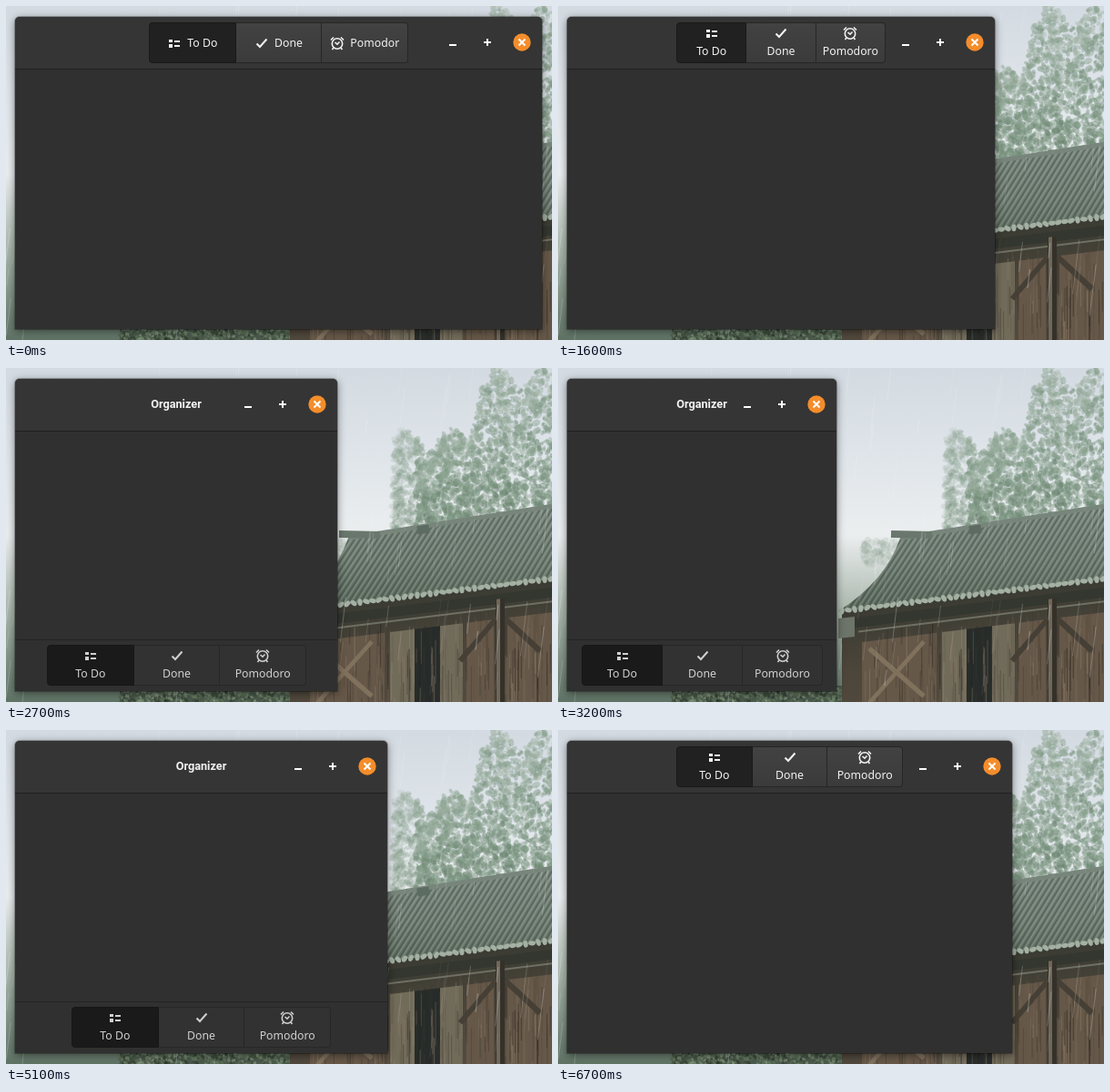
Recreate the animation shown at these times as an HTML page with a canvas. Size 600x368 px, loop 10 s.

```html
<!DOCTYPE html>
<html lang="en">
<head>
<meta charset="utf-8">
<title>Organizer</title>
<style>
html, body { margin: 0; width: 100%; height: 100%; overflow: hidden; background: #dde3e6; }
canvas { position: absolute; left: 0; top: 0; }
#win {
  position: absolute; left: 10px; top: 12px; height: 344px;
  background: #303030; border-radius: 5px 5px 0 0;
  box-shadow: 0 0 0 1px rgba(0,0,0,.25), 0 2px 10px rgba(0,0,0,.5);
  overflow: hidden; color: #f2f2f2; font: 12.3px "Noto Sans", sans-serif;
}
#head {
  position: absolute; inset: 0 0 auto; height: 57px; box-sizing: content-box;
  background: #353535; border-bottom: 1px solid #202020;
}
#title {
  position: absolute; left: 0; right: 0; top: 20px; text-align: center;
  font: bold 12.7px/16px Roboto, sans-serif;
}
#ctl { position: absolute; right: 0; top: 0; }
#bar {
  position: absolute; left: 0; right: 0; height: 57px; box-sizing: border-box;
  background: #303030; border-top: 1px solid #242424; color: #d0d0d0;
}
.sw { position: absolute; top: 6px; height: 45px; display: flex; }
.tab {
  flex: 1 1 0; min-width: 0; box-sizing: border-box; padding: 0 9px;
  display: flex; align-items: center; justify-content: center; gap: 6px;
  border: 1px solid #262626; border-left-width: 0; background: linear-gradient(#424242, #3b3b3b);
}
.tab:first-child { border-left-width: 1px; border-radius: 4px 0 0 4px; background: #212121; border-color: #191919; }
.tab:last-child { border-radius: 0 4px 4px 0; }
.stack .tab { flex-direction: column; justify-content: flex-start; gap: 4px; padding: 3px 6px 0; }
#bar .sw { top: 5px; }
#bar .tab { background: #323232; border-color: #272727; }
#bar .tab:first-child { background: #1a1a1a; border-color: #161616; }
.tab svg { flex: none; }
.tab span { line-height: 16px; white-space: nowrap; overflow: hidden; min-width: 0; max-width: 100%; }
</style>
</head>
<body>
<canvas id="bg" width="600" height="368"></canvas>
<div id="win">
  <div id="head">
    <div id="title">Organizer</div>
    <div class="sw" id="top"></div>
    <svg id="ctl" width="120" height="56">
      <path d="M18 31h8M56 28h8M60 24v8" stroke="#fff" stroke-width="2" fill="none"/>
      <circle cx="98" cy="28" r="9.7" fill="#f48d2b"/>
      <path d="M94.500 24.500l7 7m0-7l-7 7" stroke="#fff" stroke-width="2"/>
    </svg>
  </div>
  <div id="bar"><div class="sw stack" id="low"></div></div>
</div>
<script>
const $ = id => document.getElementById(id);
const win = $('win'), title = $('title'), topSw = $('top'), lowSw = $('low'), bar = $('bar');

const tabs = {
  'To Do': '<path d="M2 4h4v3H2zM2 9h4v4H2zM8 5h6v2H8zM8 10h6v2H8z" fill="currentColor" stroke="none"/>',
  'Done': '<path d="M2.500 8.500l3.500 3.500 7.500-8.500" stroke-width="2"/>',
  'Pomodoro': '<circle cx="8" cy="8.500" r="5.700"/>' +
    '<path d="M5.500 7l2.500 2.200 2.500-2.700M1 4.500l3-3M15 4.500l-3-3M4 13l-1.500 2M12 13l1.500 2"/>'
};
topSw.innerHTML = lowSw.innerHTML = Object.entries(tabs).map(([name, icon]) =>
  `<div class="tab"><svg width="16" height="16" fill="none" stroke="currentColor" stroke-width="1.600">${icon}</svg><span>${name}</span></div>`).join('');

// Backdrop: misty trees and a wooden house in the rain
const g = $('bg').getContext('2d');
let seed = 7;
const rnd = (a, b) => a + (b - a) * ((seed = seed * 16807 % 2147483647) / 2147483647);
function repeat(n, draw) {
  for (let i = 0; i < n; i++) draw(i);
}
function fade(y1, y2, ...colors) {
  const f = g.createLinearGradient(0, y1, 0, y2);
  colors.forEach((c, i) => f.addColorStop(i / (colors.length - 1), c));
  return f;
}
function box(fill, x, y, w, h) {
  g.fillStyle = fill;
  g.fillRect(x, y, w, h);
}
function line(color, width, x1, y1, x2, y2) {
  g.strokeStyle = color;
  g.lineWidth = width;
  g.beginPath();
  g.moveTo(x1, y1);
  g.lineTo(x2, y2);
  g.stroke();
}
function leaf(x, y, size, color) {
  g.fillStyle = color;
  g.beginPath();
  g.ellipse(x, y, size * 1.5, size, rnd(0, 3), 0, 7);
  g.fill();
}

function drawMist() {
  box(fade(0, 368, '#d3dae1', '#dee4e9', '#ebeeef', '#a3b1a5', '#5f7365'), 0, 0, 600, 368);
}
function drawTrees() {
  repeat(2200, () => {
    const x = rnd(425, 605), step = 1 / (1 + Math.exp((515 - x) / 3));
    const top = 78 - 68 * step + 12 * Math.sin(x / 8);
    const depth = rnd(0, 1), y = top + (178 - top) * depth;
    const light = 63 - 13 * depth + rnd(-9, 9);
    leaf(x, y, rnd(1, 3.5), `hsla(132,11%,${light}%,${x < 450 ? .2 : .45})`);
  });
  repeat(150, () => leaf(rnd(335, 430), rnd(190, 215), rnd(1, 4), 'rgba(150,170,155,.2)'));
  box('#4b5a4d', 125, 350, 187, 18);
  repeat(500, () => leaf(rnd(125, 312), rnd(350, 368), rnd(.6, 2), `hsla(110,12%,${rnd(15, 62)}%,.6)`));
}

// The facade is drawn sheared, so that the eave is level at y = EAVE
const EAVE = 306, SLOPE = .123;
function drawWall() {
  g.save();
  g.transform(1, -SLOPE, 0, 1, 0, 0);
  box(fade(EAVE, EAVE + 130, '#3a3b33', '#4c453a', '#544b3e'), 312, EAVE, 288, 160);
  const wood = '#665848', shutter = '#716b5a';
  for (const [x, w, color] of [[334, 82, wood], [422, 27, shutter], [449, 28, '#272c2a'],
    [477, 25, shutter], [506, 30, wood], [550, 50, wood]]) box(color, x, EAVE + 37, w, 120);
  repeat(230, () => {
    const x = rnd(330, 600), y = rnd(EAVE + 25, EAVE + 110);
    line(`hsla(32,14%,${rnd(8, 55)}%,.4)`, rnd(.5, 1.6), x, y, x, y + rnd(15, 60));
  });
  line('#33372f', 11, 312, EAVE + 15, 600, EAVE + 15);
  line('#6f7063', 2, 330, EAVE + 25, 600, EAVE + 25);
  for (const s of [-1, 1]) {
    line('#80715d', 5, 372 - s * 30, EAVE + 45, 372 + s * 30, EAVE + 105);
    line('#453f35', 6, 543 + s * 6, EAVE + 38, 543 + s * 44, EAVE + 78);
  }
  line('#34312a', 10, 543, EAVE + 15, 543, 460);
  line('#70675a', 4, 541, EAVE + 15, 541, 460);
  box('#6d7469', 308, EAVE + 8, 18, 22);
  g.restore();
}
function drawRoof() {
  const eave = x => EAVE - SLOPE * x, ridge = x => 247 - .158 * x;
  g.save();
  g.beginPath();
  g.moveTo(376, ridge(376));
  g.lineTo(600, ridge(600));
  g.lineTo(600, eave(600));
  g.lineTo(308, eave(308));
  g.quadraticCurveTo(360, 235, 376, ridge(376));
  g.fillStyle = fade(155, 268, '#7d8a80', '#738075', '#5c6a5d');
  g.fill();
  g.clip();
  for (let x = 312; x < 720; x += 7) {
    line('rgba(52,64,55,.4)', 2, x + 52, ridge(x + 52), x, eave(x));
    line('rgba(180,192,182,.25)', 1.3, x + 55, ridge(x + 55), x + 3, eave(x + 3));
  }
  g.restore();
  for (let x = 312; x < 602; x += 7) leaf(x, eave(x), 2.6, '#a3b0a2');
  line('#77857b', 5, 376, ridge(376), 600, ridge(600));
  line('#69776d', 8, 366, 183, 411, 184);
  line('#5d6c62', 9, 452, 179, 465, 177);
}
function drawRain() {
  repeat(150, () => {
    const x = rnd(0, 620), y = rnd(-20, 340), n = rnd(12, 60);
    line(`rgba(240,246,250,${rnd(.08, .3)})`, rnd(.5, 1.3), x, y, x - n * .12, y + n);
  });
}
[drawMist, drawTrees, drawWall, drawRoof, drawRain].forEach(draw => draw());

// Time and right edge of the dragged window
const drag = [[0, 589], [200, 589], [1000, 537], [2200, 422], [3200, 306], [3900, 306],
  [4500, 378], [5700, 460], [6700, 499], [10000, 499]];
function edgeAt(t) {
  const i = drag.findIndex(k => k[0] > t), [a, x] = drag[i - 1], [b, y] = drag[i];
  return Math.round(x + (y - x) * (t - a) / (b - a));
}
function easeOut(t) {
  const p = Math.min(1, Math.max(0, t / 300));
  return 1 - (1 - p) ** 3;
}
function place(sw, width, total) {
  sw.style.width = width + 'px';
  sw.style.left = Math.ceil((total - width) / 2) + 'px';
}
const NARROW = 2000, BROAD = 5400;
function frame(now) {
  const t = Math.floor(now % 10000 / 100) * 100;
  const edge = edgeAt(t), width = edge - 10;
  const narrow = t >= NARROW && t < BROAD, wide = edge >= 537;
  win.style.width = width + 'px';
  title.style.display = narrow ? '' : 'none';
  topSw.style.display = narrow ? 'none' : '';
  topSw.classList.toggle('stack', !wide);
  place(topSw, wide ? 285 : edge - 250, width);
  place(lowSw, Math.min(285, edge - 41), width);
  bar.style.top = Math.round(344 - 57 * (easeOut(t - NARROW) - easeOut(t - BROAD))) + 'px';
  requestAnimationFrame(frame);
}
frame(0);
</script>
</body>
</html>
```
